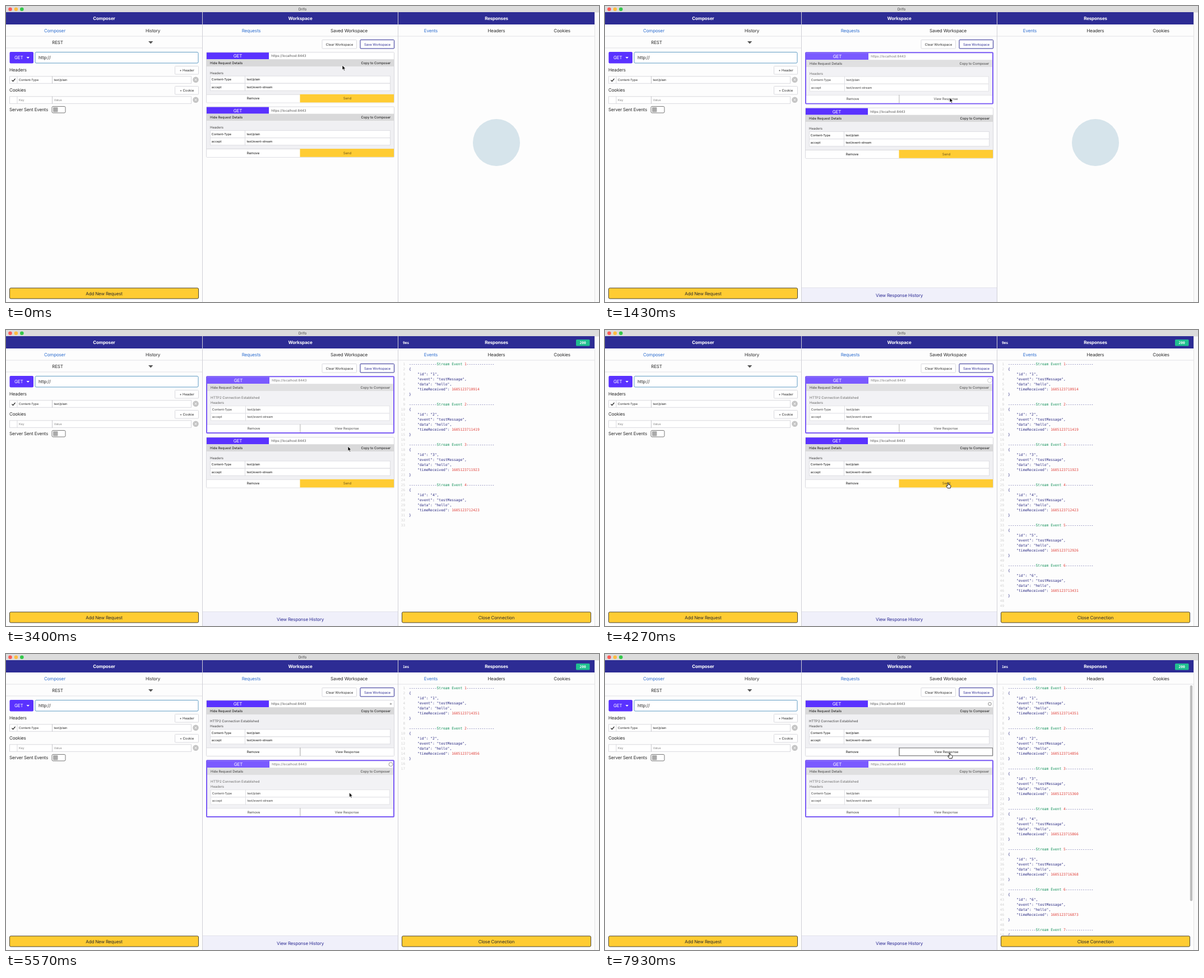
Recreate the animation shown at these times as an HTML page. Size 1058x529 px, loop 8000 ms.

```html
<!DOCTYPE html>
<html lang="en">
<head>
<meta charset="utf-8">
<title>Request composer</title>
<style>
  html, body { margin: 0; width: 100%; height: 100%; overflow: hidden; background: #fdfdfd; }
  svg { display: block; width: 1058px; height: 529px; }
  text { font-family: Inter, Roboto, sans-serif; text-rendering: geometricPrecision; white-space: pre; }
  .mono { font-family: "DejaVu Sans Mono", "Noto Sans Mono", monospace; }
</style>
</head>
<body>
<svg id="stage" viewBox="0 0 1058 529"></svg>
<script>
const LOOP = 8000;
const NAVY = '#2d2c94', LINK = '#2f6fd0', VIOLET = '#5a32ff', YELLOW = '#ffcc33';
const INK = '#2b2b2b', LINE = '#d9d9de';
const CHAR = 3.81, ROW = 9;

// Server event stamps (last six digits); they also set when each event shows up.
const FIRST = 1450;
const STREAMS = [
  [710914, 711419, 711923, 712423, 712926, 713431, 713936],
  [714351, 714856, 715360, 715866, 716368, 716873, 717378]
].map(list => list.map(stamp => ({ stamp, at: stamp - 710914 + FIRST })));
const CLICK = [1290, 4760], SENT = [1290, 4860];
const LINKED = STREAMS.map(s => s[0].at);

// time, x, y of the pointer tip
const PATH = [
  [0, 600, 106], [350, 600, 106], [900, 615, 164], [2700, 615, 164],
  [3300, 610, 208], [3500, 610, 208], [4200, 612, 273], [5300, 612, 273],
  [6100, 614, 178], [7000, 614, 178], [7800, 615, 177], [8000, 615, 177]
];
const HAND = [[860, 1290], [4130, 5330], [6030, 8000]];

const stage = document.getElementById('stage');

function el(parent, tag, attrs) {
  const node = document.createElementNS('http://www.w3.org/2000/svg', tag);
  for (const key in attrs) node.setAttribute(key, attrs[key]);
  parent.append(node);
  return node;
}
const group = (parent, attrs) => el(parent, 'g', attrs);
const rect = (p, x, y, width, height, fill, more) => el(p, 'rect', { x, y, width, height, fill, ...more });
const dot = (p, cx, cy, r, fill, more) => el(p, 'circle', { cx, cy, r, fill, ...more });
const path = (p, d, more) => el(p, 'path', { d, fill: 'none', ...more });
const box = (p, x, y, w, h, stroke, fill = '#fff', rx = 0) =>
  rect(p, x + .5, y + .5, w - 1, h - 1, fill, { stroke, rx });

// y is the vertical middle of the capitals
function text(p, str, x, y, size = 8, fill = INK, more = {}) {
  const node = el(p, 'text', {
    x, y: y + size * .36, 'font-size': size, fill,
    'letter-spacing': size === 8 ? '-.02em' : '-.005em', ...more
  });
  node.textContent = str;
  return node;
}
const mid = (p, str, x, y, size, fill, more) =>
  text(p, str, x, y, size, fill, { 'text-anchor': 'middle', ...more });
const mono = (p, str, x, y, fill, more) =>
  text(p, str, x, y, 6.33, fill, { class: 'mono', 'letter-spacing': 0, ...more });

function bigButton(p, x, label) {
  box(p, x, 503.5, 338, 20, '#4a4434', YELLOW, 2);
  mid(p, label, x + 169, 514);
}

function pairRow(p, y, key, value, on) {
  box(p, 6, y, 325, 13.5, LINE);
  rect(p, 19.5, y, 1, 13.5, LINE);
  rect(p, 82, y, 1, 13.5, '#c8c8cc');
  const tone = on ? INK : '#888';
  text(p, key, 23, y + 6.8, 5.5, tone);
  text(p, value, 85.5, y + 6.8, 5.5, tone);
  if (on) path(p, `M10.5 ${y + 7}l2 2.3 4-4.8`, { stroke: '#111', 'stroke-width': 1.2 });
  dot(p, 338.5, y + 6.5, 5.2, '#c4c4c4');
  path(p, `M336.7 ${y + 4.7}l3.6 3.6m0-3.6l-3.6 3.6`, { stroke: '#fff' });
}

function drawFrame(p) {
  rect(p, 0, 0, 1058, 529, '#fdfdfd');
  rect(p, 1050, 11, 8, 518, '#fafafa');
  rect(p, 1050, 11, 1, 518, '#e4e4e4');
  rect(p, 0, 0, 1058, 11.5, '#dcdcdc');
  rect(p, 0, 11, 1050, 22, NAVY);
  ['#fc5b57', '#fdbc40', '#34c84a'].forEach((c, i) => dot(p, 7.5 + 10.4 * i, 5.7, 3.3, c));
  mid(p, 'Drifo', 529, 6, 6.5, '#444');

  const columns = [
    ['Composer', 175, [['Composer', 87], ['History', 262]]],
    ['Workspace', 525, [['Requests', 437.5], ['Saved Workspace', 612]]],
    ['Responses', 875, [['Events', 758], ['Headers', 875], ['Cookies', 992]]]
  ];
  for (const [title, x, tabs] of columns) {
    mid(p, title, x, 22, 8, '#fff', { 'font-weight': 700 });
    tabs.forEach(([name, tx], i) => mid(p, name, tx, 44, 8, i ? INK : LINK));
  }
  rect(p, 0, 53.5, 1050, 1, '#e2e2e6');
  rect(p, 350, 11, 1, 518, '#cfcfd6');
  rect(p, 699, 11, 1, 518, '#cfcfd6');
}

function drawComposer(p) {
  mid(p, 'REST', 92, 64.8);
  path(p, 'M254 63h8.4l-4.2 4.5z', { fill: '#555' });
  rect(p, 0, 74.5, 350, 1, '#e2e2e6');
  rect(p, 6.5, 82, 42.5, 20.5, VIOLET, { rx: 2 });
  text(p, 'GET', 15, 92.2, 8, '#fff');
  path(p, 'M36.5 91h5.4l-2.7 3z', { fill: '#fff' });
  box(p, 51.5, 82, 292, 20.5, '#5f9bc4', '#fff', 2);
  text(p, 'http://', 58, 92.2);

  [['Headers', '+ Header', 114], ['Cookies', '+ Cookie', 150]].forEach(([name, add, y]) => {
    text(p, name, 6, y);
    box(p, 301, y - 7, 43, 15.5, LINE, '#fff', 1);
    mid(p, add, 322.5, y + .9, 6);
  });
  pairRow(p, 125.3, 'Content-Type', 'text/plain', true);
  pairRow(p, 161.3, 'Key', 'Value', false);
  text(p, 'Server Sent Events', 6, 185.3);
  box(p, 81.5, 179, 25, 12.5, '#777', '#fff', 2);
  rect(p, 84, 181, 8.5, 8.5, '#aaa', { rx: 1 });
  bigButton(p, 6, 'Add New Request');
}

function drawTools(p) {
  box(p, 563.5, 60, 62.5, 16.5, LINE, '#fff', 1);
  mid(p, 'Clear Workspace', 595, 68.4, 6);
  box(p, 631.5, 60, 61.5, 16.5, NAVY, '#fff', 1);
  mid(p, 'Save Workspace', 662.5, 68.4, 6, NAVY);
}

// Draws one request card and returns its outer height.
function drawCard(p, top, { selected, sent, linked, focus, hover }) {
  const edge = selected ? 2 : 1, extra = linked ? 9.6 : 0;
  const left = 357 + edge, right = 693 - edge, wide = right - left;
  const body = 49.8 + extra, height = 89.2 + extra + 2 * edge;
  const y = top + edge;
  rect(p, 357 + edge / 2, top + edge / 2, 336 - edge, height - edge, '#fff', {
    stroke: selected ? '#7a5af5' : LINE, 'stroke-width': edge, rx: 1
  });
  const g = group(p, { opacity: selected ? .8 : 1 });
  rect(g, left, y, 111, 12, VIOLET);
  mid(g, 'GET', left + 55.5, y + 6.1, 8, '#fff');
  text(g, 'https://localhost:8443', left + 115.3, y + 5.9, 6, '#555');
  rect(g, left, y + 12, wide, 12.8, '#d9d9da');
  text(g, 'Hide Request Details', left + 6, y + 18.4, 6, '#111');
  text(g, 'Copy to Composer', right - 5.8, y + 18.4, 6, '#111', { 'text-anchor': 'end' });

  const by = y + 24.8;
  rect(g, left, by, wide, body, '#f0f0f3');
  if (linked) text(g, 'HTTP2 Connection Established', left + 6, by + 11.5, 6, '#444');
  text(g, 'Headers', left + 6, by + 11.5 + extra, 6, '#444');
  const ty = by + 16.6 + extra;
  [['Content-Type', 'text/plain'], ['accept', 'text/event-stream']].forEach(([key, value], i) => {
    const ry = ty + 13.2 * i;
    box(g, left + 6, ry, wide - 12, 14, '#dedee3');
    rect(g, left + 68, ry, 1, 14, LINE);
    text(g, key, left + 8.8, ry + 6.8, 5.5, '#111');
    text(g, value, left + 71.5, ry + 6.8, 5.5, '#111');
  });

  const fy = by + body, half = 525 - left;
  rect(g, left, fy, wide, 14.6, '#fff');
  rect(g, left, fy, wide, .8, '#cfcfd4');
  mid(g, 'Remove', left + 83, fy + 7.4, 6, '#111');
  if (sent) rect(g, 524.5, fy, .8, 14.6, '#888');
  else rect(g, 524.5, fy, wide - half + .5, 14.6, YELLOW);
  if (focus) rect(g, 525.2, fy + .7, wide - half - .9, 13.2, 'none', { stroke: '#7464c8', 'stroke-width': 1.4 });
  if (hover) box(g, 524.5, fy, wide - half + .5, 14.8, '#777', 'none');
  mid(g, sent ? 'View Response' : 'Send', 609 - (selected ? 1 : 0), fy + 7.4, 6,
    sent ? '#222' : focus ? '#a08a45' : '#6a5518');
  return height;
}

function drawEvents(p, stream, count) {
  const left = 719, line = n => 61.2 + ROW * n;
  const ink = '#25257f', red = '#e0403a';
  const clip = group(p, { 'clip-path': 'url(#pane)' });
  for (let n = 0; n <= 8 * count; n++)
    mono(clip, n + 1, 712, line(n), '#cfcfcf', { 'text-anchor': 'end', 'font-size': 6 });
  stream.slice(0, count).forEach(({ stamp }, i) => {
    const put = (row, col, str, fill = ink) => mono(clip, str, left + col * CHAR, line(8 * i + row), fill);
    const dashes = '-'.repeat(13);
    put(0, 0, dashes);
    put(0, 13, 'Stream Event', '#12915a');
    put(0, 26, i + 1, red);
    put(0, 27, dashes);
    put(1, 0, '{');
    put(2, 4, `"id": "${i + 1}",`);
    put(3, 4, '"event": "testMessage",');
    put(4, 4, '"data": "hello",');
    put(5, 4, '"timeReceived":');
    put(5, 20, '1605123' + stamp, red);
    put(6, 0, '}');
  });
  if (count > 6) rect(p, 1043.8, 56, 4.4, 385.5, '#bdbdbd', { rx: 2.2 });
}

function drawResponse(p, index, count) {
  if (!count) return dot(p, 875, 244, 42, '#d6e4eb');
  mono(p, index ? '1ms' : '9ms', 708, 22.3, '#fff', { 'font-weight': 700 });
  rect(p, 1017, 17, 24.5, 11.5, '#20bf90', { rx: 1.5 });
  mono(p, '200', 1029.2, 22.8, '#fff', { 'font-weight': 700, 'text-anchor': 'middle' });
  drawEvents(p, STREAMS[index], count);
  bigButton(p, 706, 'Close Connection');
}

function drawHistory(p) {
  rect(p, 351, 503.5, 348, 25.5, '#f0f0fa');
  rect(p, 351, 503, 348, 1, '#e2e2ec');
  mid(p, 'View Response History', 525, 516.8, 8, NAVY);
}

const pane = el(el(stage, 'defs'), 'clipPath', { id: 'pane' });
rect(pane, 700, 54, 350, 448.5);
const base = group(stage);
drawFrame(base);
drawComposer(base);
drawTools(base);
const live = group(stage);
const rings = [0, 1].map(() => dot(stage, 686.5, 0, 0, 'none', { stroke: '#666', 'stroke-width': .8 }));
const arrow = path(stage, 'M0 0V8.2L1.9 6.5 3.2 9.5 4.6 8.9 3.3 6H5.8Z',
  { fill: '#000', stroke: '#fff', 'stroke-width': .7 });
const hand = path(stage,
  'M-.9 .2Q0-.9.9.2V3.4L3.6 4Q5 4.3 5 5.6L4.2 9.6H-.8L-3.2 6Q-3.4 4.8-2.2 5L-.9 6Z',
  { fill: '#fff', stroke: '#111', 'stroke-width': .9, 'stroke-linejoin': 'round' });

function pointer(t) {
  const i = Math.max(1, PATH.findIndex(k => k[0] > t));
  const [t0, x0, y0] = PATH[i - 1], [t1, x1, y1] = PATH[i];
  const u = (t - t0) / (t1 - t0), e = u * u * (3 - 2 * u);
  return [x0 + (x1 - x0) * e, y0 + (y1 - y0) * e];
}

let shown = '', tops = [82.2, 179.6];

function redraw(t, active, count, cards) {
  live.replaceChildren();
  let top = 82.2;
  cards.forEach((card, i) => {
    tops[i] = top;
    top += drawCard(live, top, card) + 6.2;
  });
  if (active >= 0) drawHistory(live);
  drawResponse(live, Math.max(active, 0), count);
}

function render(t) {
  const active = CLICK.filter(c => t >= c).length - 1;
  const count = active < 0 ? 0 : STREAMS[active].filter(e => t >= e.at).length;
  const cards = [0, 1].map(i => ({
    selected: i === active,
    sent: t >= SENT[i],
    linked: t >= LINKED[i],
    focus: i === 1 && t >= CLICK[1] && t < SENT[1],
    hover: i === 0 && t >= 6030
  }));
  const key = JSON.stringify([active, count, cards]);
  if (key !== shown) {
    shown = key;
    redraw(t, active, count, cards);
  }

  // Each open connection pulses once a second.
  rings.forEach((ring, i) => {
    const age = t - LINKED[i], phase = (age % 1000) / 1000;
    ring.setAttribute('cy', tops[i] + (cards[i].selected ? 8 : 7));
    ring.setAttribute('r', age < 0 ? 0 : 4.4 * phase ** .65);
    ring.setAttribute('opacity', age < 0 || phase < .06 ? 0 : Math.max(0, Math.min(1, (.94 - phase) / .3)));
  });

  const [x, y] = pointer(t);
  const pointing = HAND.some(([a, b]) => t >= a && t < b);
  arrow.setAttribute('visibility', pointing ? 'hidden' : 'visible');
  hand.setAttribute('visibility', pointing ? 'visible' : 'hidden');
  (pointing ? hand : arrow).setAttribute('transform', `translate(${x} ${y})`);
}

const start = performance.now();
function tick() {
  render((performance.now() - start) % LOOP);
  requestAnimationFrame(tick);
}
tick();
</script>
</body>
</html>
```
